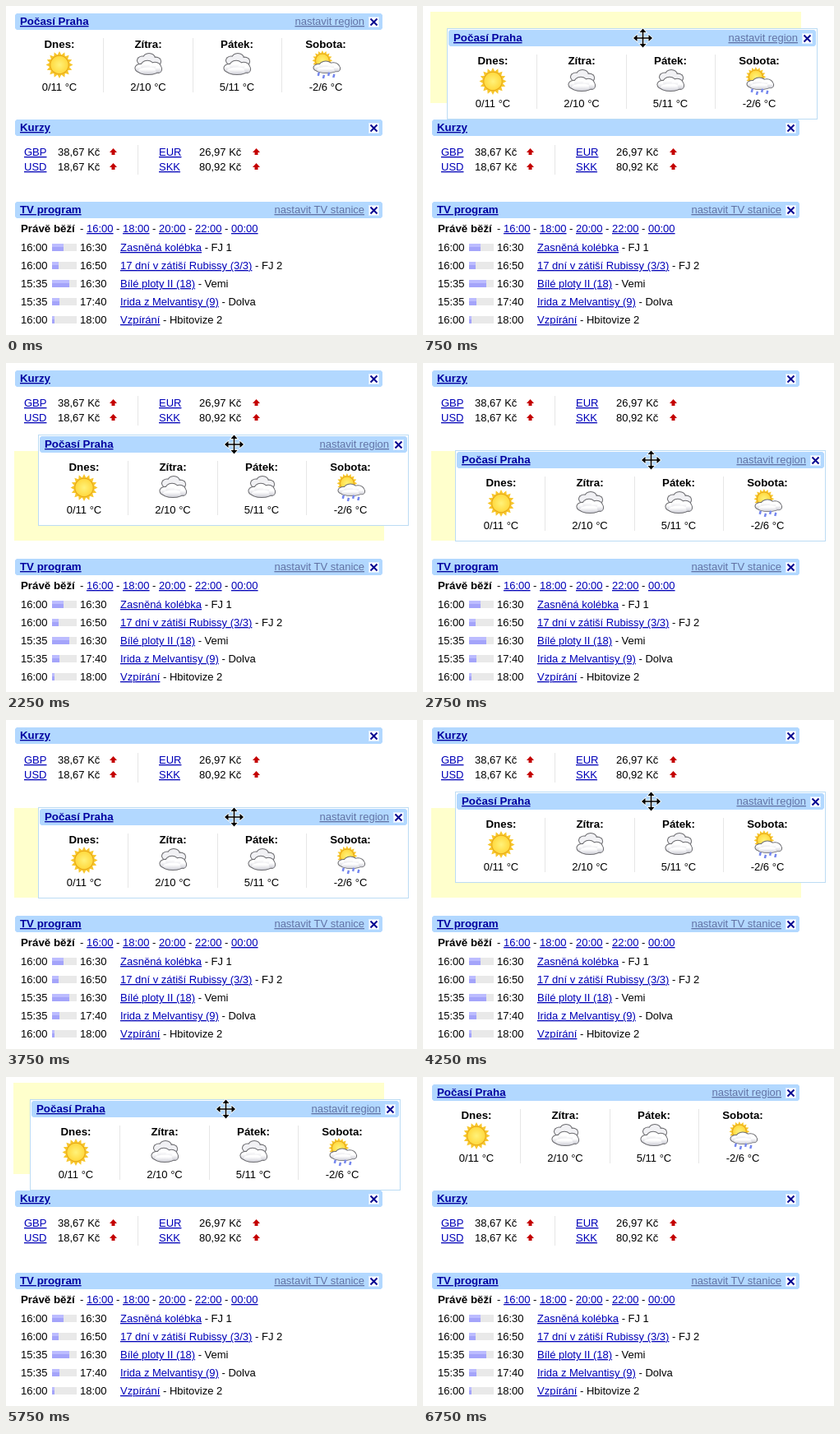
Write an HTML page that moves like this. It is 500 px wide and 400 px high and loops after 7 s.

```html
<!DOCTYPE html>
<html lang="cs">
<head>
<meta charset="utf-8">
<title>Přetahování panelu</title>
<style>
html, body { margin: 0; width: 100%; height: 100%; overflow: hidden; background: #fff; }
svg { display: block; }
text { font: 13px Arial, "Liberation Sans", sans-serif; fill: #000; }
rect, .rule { shape-rendering: crispEdges; }
.b, .title { font-weight: bold; font-size: 13.3px; }
.mid { text-anchor: middle; }
.a, .title, .set { text-decoration: underline 1px; text-underline-offset: 1px; text-decoration-skip-ink: none; }
.a { fill: #0000b8; }
.title { fill: #0000a0; }
.set { fill: #6273a5; text-anchor: end; }
.rule { stroke: #e6e6e6; }
</style>
</head>
<body>
<svg id="stage" width="500" height="400" viewBox="0 0 500 400"></svg>
<script>
const text = (x, y, s, cls = '') => `<text x="${x}" y="${y}" class="${cls}">${s}</text>`;
const rect = (x, y, w, h, fill, more = '') =>
  `<rect x="${x}" y="${y}" width="${w}" height="${h}" fill="${fill}" ${more}/>`;
const rule = (x, y1, y2) => `<path class="rule" d="M${x + .5} ${y1}V${y2}"/>`;
const at = (x, y, body, scale = 1) => `<g transform="translate(${x} ${y}) scale(${scale})">${body}</g>`;

function header(y, title, setting = '') {
  return `<path d="M13 ${y}H456L458 ${y + 2}V${y + 18}L456 ${y + 20}H13L11 ${y + 18}V${y + 2}Z" fill="#b2d8ff"/>` +
    text(17, y + 14, title, 'title') + text(436, y + 14, setting, 'set') +
    rect(441.5, y + 4.5, 12, 12, '#fff', 'stroke="#dcedff"') +
    `<path d="M443.5 ${y + 6.5}l8 8m0 -8l-8 8" stroke="#000090" stroke-width="2"/>`;
}

function sun(size) {
  const rays = Array.from({ length: 32 }, (_, i) => {
    const r = size * (i % 2 ? .74 : 1), a = i * Math.PI / 16;
    return (r * Math.cos(a)).toFixed(2) + ',' + (r * Math.sin(a)).toFixed(2);
  });
  return `<polygon points="${rays.join(' ')}" fill="#f7c62c"/>` +
    `<circle r="${size * .68}" fill="url(#sunFill)" stroke="#e8a818"/>`;
}

// Puffs are drawn twice: a grey rim first, then the fill on top
function puffs(list, fill) {
  const layer = grow => list.map(([x, y, rx, ry]) =>
    `<ellipse cx="${x}" cy="${y}" rx="${rx + grow}" ry="${ry + grow}"/>`).join('');
  return `<g fill="#6c6c70">${layer(.6)}</g><g fill="${fill}">${layer(-.4)}</g>`;
}
const backCloud = puffs([[-7, -5, 6, 5], [1, -8, 7, 5.5], [9, -4, 6, 5]], '#f1f1f4');
const frontCloud = puffs([[-9, 4, 6.5, 5], [-1, 2, 8, 7], [8, 3, 7, 6], [0, 7, 12, 4.5], [12, 5, 4, 4.5]], 'url(#cloudFill)');
const cloud = backCloud + frontCloud;
const rain = at(-4, -5, sun(12)) + at(1, 0, frontCloud, '1 .85') +
  [[-8, 11], [-2, 14], [4, 11], [10, 13]].map(([x, y]) =>
    `<path d="M${x} ${y - 2}l-1 4" stroke="#7486ee" stroke-width="2.4"/>`).join('');

const days = [
  [65, 'Dnes:', '0/11 °C', sun(16)],
  [173, 'Zítra:', '2/10 °C', cloud],
  [281, 'Pátek:', '5/11 °C', cloud],
  [389, 'Sobota:', '-2/6 °C', rain]
];
const weather = header(9, 'Počasí Praha', 'nastavit region') +
  [118, 227, 335].map(x => rule(x, 39, 105)).join('') +
  days.map(([x, day, temp, icon]) =>
    text(x, 51, day, 'b mid') + at(x, 71.5, icon, 1.03) + text(x, 103, temp, 'mid')).join('');

const rate = (x, xVal, xArrow, y, code, value) =>
  text(x, y, code, 'a') + text(xVal, y, value) +
  `<path d="M${xArrow} ${y - 9}l4.5 5h-2.5v3h-4v-3h-2.5Z" fill="#c40000"/>`;
const rates = header(138, 'Kurzy') + rule(160, 169, 205) +
  rate(22, 63, 130.5, 182, 'GBP', '38,67 Kč') + rate(22, 63, 130.5, 200, 'USD', '18,67 Kč') +
  rate(186, 235, 304.5, 182, 'EUR', '26,97 Kč') + rate(186, 235, 304.5, 200, 'SKK', '80,92 Kč');

const shows = [
  ['16:00', '16:30', 14, 'Zasněná kolébka', 'FJ 1'],
  ['16:00', '16:50', 8, '17 dní v zátiší Rubissy (3/3)', 'FJ 2'],
  ['15:35', '16:30', 21, 'Bílé ploty II (18)', 'Vemi'],
  ['15:35', '17:40', 9, 'Irida z Melvantisy (9)', 'Dolva'],
  ['16:00', '18:00', 3, 'Vzpírání', 'Hbitovize 2']
];
const tv = header(238, 'TV program', 'nastavit TV stanice') + text(18, 275, 'Právě běží', 'b') +
  ['16:00', '18:00', '20:00', '22:00', '00:00'].map((s, i) =>
    text(90 + 44 * i, 275, '-') + text(98 + 44 * i, 275, s, 'a')).join('') +
  shows.map(([from, to, done, name, station], i) => {
    const y = 298 + 22 * i;
    return text(18, y, from) + rect(56, y - 9, 30, 9, '#e9e9e9') +
      rect(56, y - 9, done, 4, '#bcbcff') + rect(56, y - 5, done, 5, '#a4a4fa') +
      text(90, y, to) + text(139, y, `<tspan class="a">${name}</tspan> - ${station}`);
  }).join('');

const arm = '<path d="M-.8 0V-7H-4L0 -11.5L4 -7H.8V0Z"/>';
const arms = [0, 90, 180, 270].map(a => `<g transform="rotate(${a})">${arm}</g>`).join('');
const cursor = `<g stroke="#fff" stroke-width="1.6">${arms}</g>${arms}`;

const stage = document.getElementById('stage');
stage.innerHTML = `<defs>
  <radialGradient id="sunFill"><stop offset="0" stop-color="#fff27a"/><stop offset="1" stop-color="#ffd83c"/></radialGradient>
  <linearGradient id="cloudFill" x2="0" y2="1"><stop offset=".3" stop-color="#fff"/><stop offset="1" stop-color="#d0d0d8"/></linearGradient>
  </defs>` +
  `<g id="slot">${rect(0, 0, 1, 1, '#ffffcc')}</g><g id="rates">${rates}</g>${tv}` +
  `<g id="panel"><g id="frame">${rect(9.5, 7.5, 450, 110, '#fff', 'stroke="#bcdcf4"')}</g>${weather}` +
  `<g id="cursor">${at(247.5, 19, cursor)}</g></g>`;

const [slot, ratesBox, panel, frame, pointer] =
  ['slot', 'rates', 'panel', 'frame', 'cursor'].map(id => document.getElementById(id));
const slotRect = slot.firstChild;
const path = [[0, 0], [0, 0], [20, 20], [30, 40], [30, 60], [30, 80], [30, 99], [0, 99]];
const show = (el, on) => el.setAttribute('visibility', on ? 'visible' : 'hidden');

function draw(ms) {
  const beat = Math.floor((ms + 250) / 500) % 14;
  const step = Math.min(beat, 14 - beat); // there and back again
  const held = step > 0 && step < 7;
  const swapped = step >= 5;
  const box = swapped ? [10, 107, 450, 109] : [9, 7, 451, 111];
  ['x', 'y', 'width', 'height'].forEach((key, i) => slotRect.setAttribute(key, box[i]));
  [slot, frame, pointer].forEach(el => show(el, held));
  ratesBox.setAttribute('transform', `translate(0 ${swapped ? -129 : 0})`);
  panel.setAttribute('transform', `translate(${path[step]})`);
}

const start = performance.now();
function tick() {
  draw((performance.now() - start) % 7000);
  requestAnimationFrame(tick);
}
tick();
</script>
</body>
</html>
```
